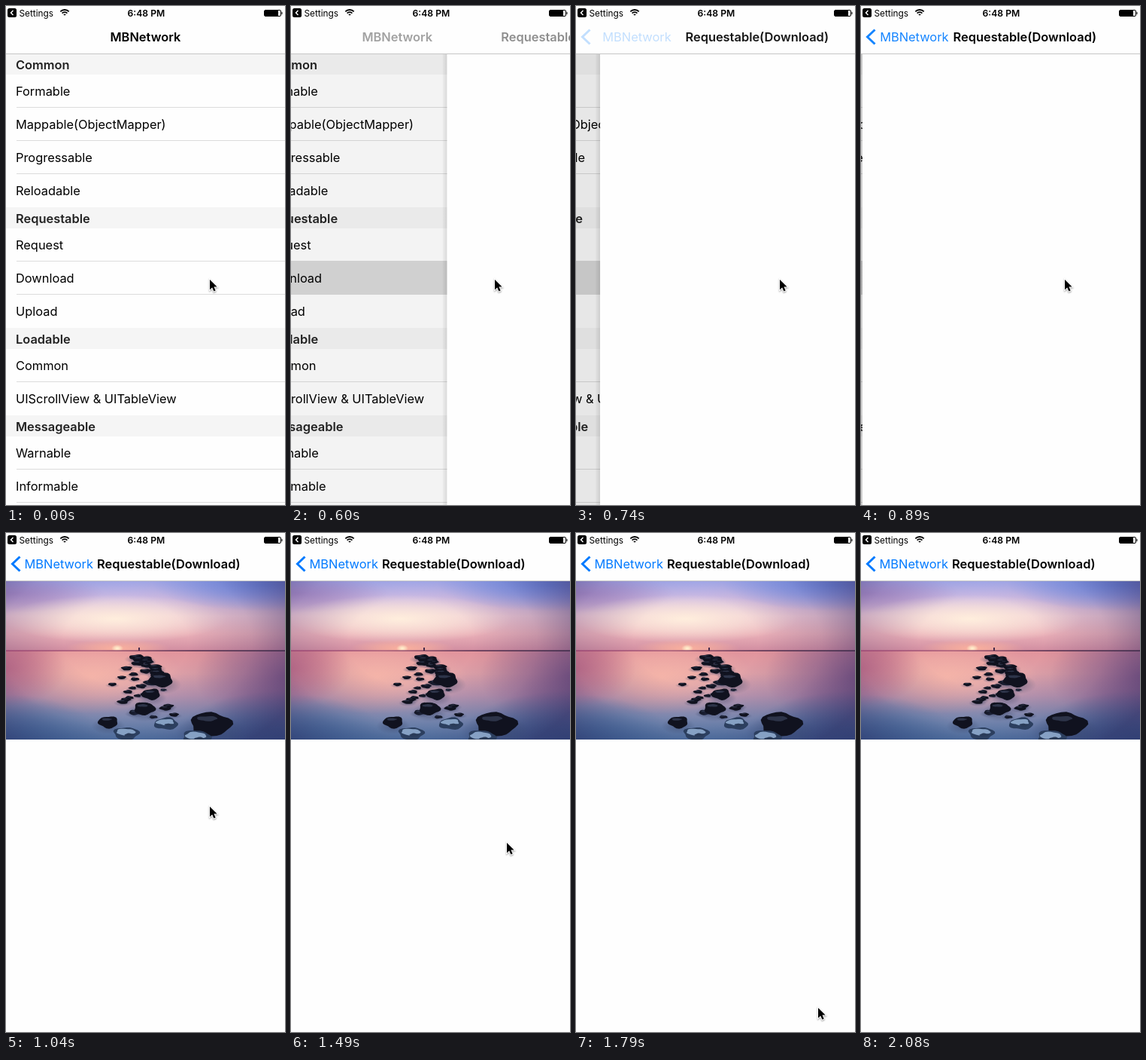
Recreate the animation shown at these times as an HTML page with a canvas. Size 371 by 662 pixels, loop 2.78 s.

```html
<!DOCTYPE html>
<html lang="en">
<head>
<meta charset="utf-8">
<title>MBNetwork</title>
<style>
html, body { margin: 0; width: 100%; height: 100%; overflow: hidden; background: #fefefe; }
canvas { display: block; }
</style>
</head>
<body>
<canvas id="stage" width="371" height="662"></canvas>
<script>
const W = 371, H = 662, LOOP = 2780, NAV = 64, HORIZON = 157, PHOTO_END = 274;
const BLUE = '#007aff', PAPER = '#fefefe';
const c = document.getElementById('stage').getContext('2d');

// The screen refreshes only at these times (ms).
const ticks = [0, 600, 740, 890, 1040, 1490, 1640, 1790, 1930, 2080];
const LOADED = 4;
const pointerPath = [[271, 363], [287, 411], [307, 551], [322, 630], [324, 640]];

const sections = [
  ['Common', 'Formable', 'Mappable(ObjectMapper)', 'Progressable', 'Reloadable'],
  ['Requestable', 'Request', 'Download', 'Upload'],
  ['Loadable', 'Common', 'UIScrollView & UITableView'],
  ['Messageable', 'Warnable', 'Informable', '']
];

let seed = 7;
function random() {
  seed = seed * 16807 % 2147483647;
  return seed / 2147483647;
}

// A trail of stones that widens and grows towards the viewer: x, y, radius.
const stones = Array.from({ length: 38 }, (_, i) => {
  const f = i / 38, spread = 8 + 55 * f;
  return [182 - 12 * f + (random() * 2 - 1) * spread, 165 + 82 * f ** 1.4, 4 + 7 * random()];
});
const boulders = [[206, 195, 17], [193, 214, 13], [184, 233, 15], [136, 251, 14], [272, 254, 29]];
const wetRocks = [[160, 266, 18], [213, 253, 17], [253, 271, 20]];

function box(x, y, w, h, fill) {
  c.fillStyle = fill;
  c.fillRect(x, y, w, h);
}

function text(s, x, y, size = 16.4, weight = 400, fill = '#000', alpha = 1) {
  c.globalAlpha = alpha;
  c.font = `${weight} ${size}px Inter, sans-serif`;
  c.fillStyle = fill;
  c.fillText(s, x, y);
  c.globalAlpha = 1;
}

function line(points, width, color) {
  c.beginPath();
  points.forEach(p => c.lineTo(...p));
  c.lineWidth = width;
  c.strokeStyle = color;
  c.stroke();
}

function fade(x0, y0, x1, y1, ...colors) {
  const g = c.createLinearGradient(x0, y0, x1, y1);
  colors.forEach((col, i) => g.addColorStop(i / (colors.length - 1), col));
  return g;
}

function radial(x, y, rx, ry, alpha, ...colors) {
  c.save();
  c.globalAlpha = alpha;
  c.translate(x, y);
  c.scale(rx, ry);
  const g = c.createRadialGradient(0, 0, 0, 0, 0, 1);
  colors.forEach((col, i) => g.addColorStop(i / (colors.length - 1), col));
  c.fillStyle = g;
  c.fillRect(-3, -3, 6, 6);
  c.restore();
}

const glow = (x, y, rx, ry, color, alpha) =>
  radial(x, y, rx, ry, alpha, color, color + '90', color + '00');

function blob(x, y, rx, ry, fill) {
  c.beginPath();
  for (let a = 0; a < 6.28; a += .25) {
    const r = .93 + .08 * Math.sin(3 * a + x) + .06 * Math.sin(5 * a + y);
    c.lineTo(x + Math.cos(a) * rx * r, y + Math.sin(a) * ry * r);
  }
  c.fillStyle = fill;
  c.fill();
}

function rock([x, y, r], flat) {
  const ry = r * flat;
  glow(x, y + ry * .6, r * 1.6, ry * 1.3, '#37456a', .5);
  blob(x, y, r, ry, '#10121f');
  blob(x - r * .15, y - ry * .45, r * .5, ry * .2, '#53607f70');
}

function wetRock([x, y, r]) {
  blob(x, y, r, r * .5, '#2c3f5f');
  blob(x - 1, y - r * .12, r * .75, r * .25, '#86a1c4');
  blob(x + r * .2, y + r * .1, r * .35, r * .12, '#2a3b58');
}

function clipped(y, bottom, draw) {
  c.save();
  c.beginPath();
  c.rect(0, y, W, bottom - y);
  c.clip();
  draw();
  c.restore();
}

function sky() {
  box(0, NAV, W, 93, fade(0, NAV, 0, HORIZON, '#a9b0f0', '#d0bce2', '#ecc6d2', '#eab0b8', '#d08ca0'));
  glow(345, 68, 150, 36, '#7096f4', .9);
  glow(10, 80, 120, 26, '#a27cc0', .6);
  glow(145, 114, 150, 32, '#ffeedd', 1);
  glow(148, 153, 70, 12, '#ffb49c', .9);
  glow(148, 153, 8, 5, '#fff3d0', 1);
}

function water() {
  box(0, HORIZON, W, 117, fade(0, HORIZON, 0, PHOTO_END, '#e2949c', '#dfa1a8', '#bf9ab2', '#8697ba', '#5485b0'));
  glow(115, 190, 120, 50, '#fab8a8', .8);
  glow(0, 180, 80, 50, '#c0587c', .6);
  glow(371, 190, 120, 70, '#84588c', .7);
  glow(0, PHOTO_END, 130, 60, '#3474a4', .8);
  glow(371, PHOTO_END, 150, 65, '#2c6294', .8);
}

function photo() {
  clipped(NAV, HORIZON, sky);
  clipped(HORIZON, PHOTO_END, water);
  clipped(NAV, PHOTO_END, () => {
    radial(160, 145, 250, 170, .6, '#3a2a6800', '#3a2a6800', '#3a2a6850', '#30245cff');
    stones.forEach(s => rock(s, .4));
    boulders.forEach(b => rock(b, .6));
    wetRocks.forEach(wetRock);
  });
  box(0, 155.5, W, 1.5, fade(0, 0, W, 0, '#9c4773', '#a85c78', '#56304f', '#392947'));
  box(176, 152, 2, 4, '#45294a');
}

function list(selected) {
  let y = 63;
  for (const [head, ...rows] of sections) {
    box(0, y, W, 28, '#f5f5f5');
    text(head, 13, y + 20.5, 16.4, 600, '#222');
    y += 28;
    rows.forEach((name, i) => {
      const on = selected && name === 'Download';
      if (on) box(0, y - 1, W, 45, '#d9d9d9');
      text(name, 13, y + 28);
      if (!on && i < rows.length - 1) box(14, y + 43, W, 1, '#dcdcdc');
      y += 44;
    });
  }
}

function pages(p) {
  const edge = W * (1 - p);
  if (p === 1) return photo();
  c.save();
  c.translate(-112.5 * p, 0);
  list(p > 0);
  c.restore();
  if (!p) return;
  box(0, NAV, edge, H, `rgba(0,0,0,${.1 * p})`);
  box(edge - 6, NAV, 6, H, fade(edge - 6, 0, edge, 0, '#00000006', '#0000001c'));
  box(edge, NAV, W, H, PAPER);
}

function navBar(p) {
  box(0, 0, W, 63, PAPER);
  box(0, 63, W, 1, '#c6c6c6');
  const left = 1 - p, x = Math.min(138.5, 24.5 + 125 * left), back = p ** 16;
  text('MBNetwork', x, 47, 16.4, 600, '#000', Math.max(0, 1 - 1.45 * p));
  if (!p) return;
  text('MBNetwork', x, 47, 16.4, 400, BLUE, back);
  text('Requestable(Download)', 121 + 283 * left, 47, 16.4, 600, '#000', p);
  c.globalAlpha = back;
  line([[18.5, 31.5], [8.5, 41], [18.5, 50.5]], 3, BLUE);
  c.globalAlpha = 1;
}

function wifi(x, y) {
  c.strokeStyle = '#000';
  c.lineWidth = 1.8;
  for (const r of [1.5, 4.8, 8]) {
    c.beginPath();
    c.arc(x, y, r, -Math.PI * .75, -Math.PI * .25);
    c.stroke();
  }
}

function statusBar() {
  c.fillStyle = '#000';
  c.beginPath();
  c.roundRect(2, 3, 12, 12, 2.5);
  c.fill();
  line([[9.5, 6], [6.5, 9], [9.5, 12]], 1.5, '#fff');
  text('Settings', 17.5, 13.5, 11.8);
  text('6:48 PM', 161.5, 13.5, 12.2, 600);
  wifi(78, 13);

  c.lineWidth = 1;
  c.beginPath();
  c.roundRect(343.5, 5.5, 22, 8, 1.5);
  c.stroke();
  box(344, 6, 18, 7, '#000');
  box(366.5, 8, 1, 3, '#000');
}

function pointer(x, y) {
  c.save();
  c.translate(x, y);
  const arrow = new Path2D('M0 0V13.5L3.2 10.5L5.4 15.6L7.7 14.6L5.5 9.6H9.6Z');
  c.shadowColor = '#0006';
  c.shadowBlur = 2;
  c.shadowOffsetY = 1;
  c.strokeStyle = '#fff';
  c.lineWidth = 2;
  c.stroke(arrow);
  c.shadowColor = 'transparent';
  c.fillStyle = '#000';
  c.fill(arrow);
  c.restore();
}

// Spring-like settling of the pushed page.
const push = t => 1 - Math.exp(-((.008 * (t - 513)) ** 1.5));

function draw(t) {
  const step = ticks.findLastIndex(at => at <= t);
  const p = step === 0 ? 0 : step >= LOADED ? 1 : push(ticks[step]);
  const tip = pointerPath[Math.max(0, step - LOADED)];
  box(0, 0, W, H, PAPER);
  pages(p);
  navBar(p);
  statusBar();
  if (tip) pointer(...tip);
}

let start;
function tick(now) {
  start ??= now;
  draw((now - start) % LOOP);
  requestAnimationFrame(tick);
}
requestAnimationFrame(tick);
</script>
</body>
</html>
```
